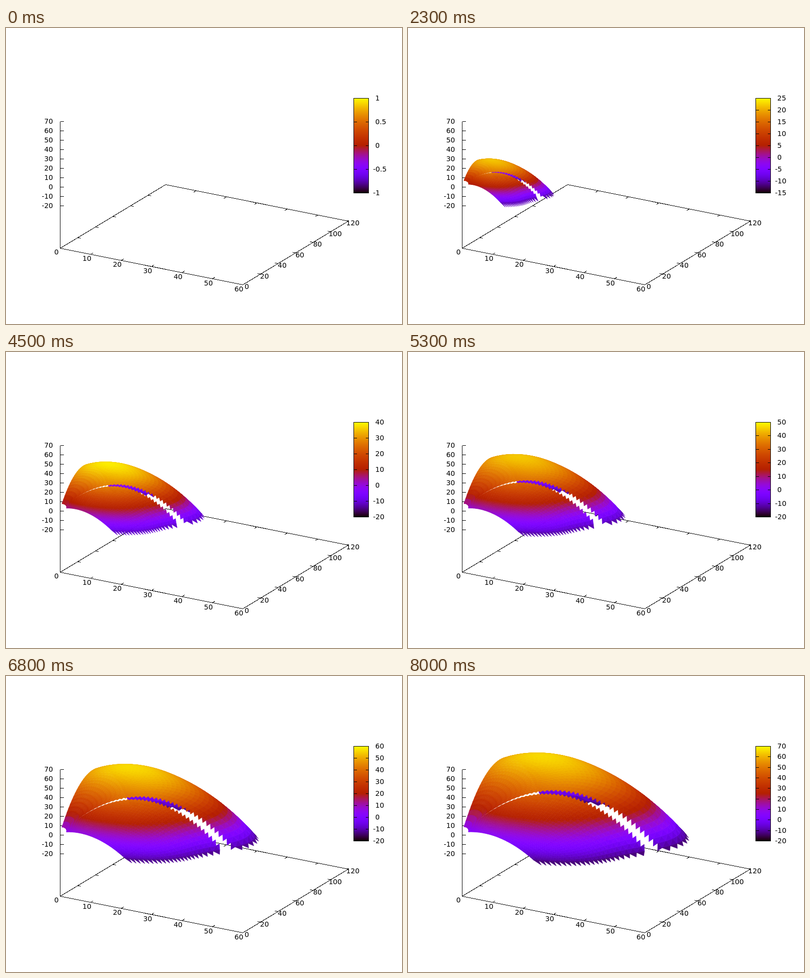
Write an HTML page with a canvas that moves like this. It is 800 px wide and 600 px high and loops after 8.1 s.

```html
<!DOCTYPE html>
<html lang="en">
<head>
<meta charset="utf-8">
<title>Launch surface</title>
<style>
  html, body { margin: 0; width: 100%; height: 100%; overflow: hidden; background: #fff; }
  svg, canvas { position: absolute; left: 0; top: 0; width: 800px; height: 600px; }
  text { font: 14px "DejaVu Sans", Verdana, sans-serif; fill: #000; white-space: pre; }
  path { fill: none; stroke: #000; stroke-width: 1; shape-rendering: crispEdges; }
  rect { shape-rendering: crispEdges; }
</style>
</head>
<body>
<svg viewBox="0 0 800 600">
  <g id="axes"></g>
  <g id="bar"></g>
  <g id="scale"></g>
</svg>
<canvas id="view" width="800" height="600"></canvas>
<script>
const STEPS = 81, STEP_MS = 100;
const RAD = Math.PI / 180;
const LAUNCH_Z = 4, T0 = 0.5, DT = 0.66;
const ctx = document.getElementById('view').getContext('2d');
const byId = id => document.getElementById(id);

// ---------- projection and palette ----------
const project = (x, y, z) => [
  109.5 + 6.15 * x + 1.775 * y,
  322.5 + 1.233 * x - 1.075 * y - 1.9 * z
];

function palette(f) {
  f = Math.min(1, Math.max(0, f));
  const c = v => Math.round(255 * Math.max(0, v));
  return `rgb(${c(Math.sqrt(f))},${c(f ** 3)},${c(Math.sin(2 * Math.PI * f))})`;
}

// ---------- static drawing ----------
const line = (x, y, dx, dy) => `M${x + 0.5} ${y + 0.5}l${dx} ${dy}`;
const label = (x, y, s, anchor) =>
  `<text x="${x}" y="${y}" text-anchor="${anchor}">${s}</text>`;

function drawAxes() {
  let d = 'M109.5 446.5L478.5 520.5L691.5 391.5L322.5 317.5ZM109.5 446.5V189.5';
  let texts = '';
  for (let i = 0; i <= 6; i++) {
    const ax = 109 + 61.5 * i, ay = 446 + 12.33 * i;
    const bx = 109 + 35.5 * i, by = 446 - 21.5 * i;
    if (i > 0 && i < 6) {
      d += line(ax, ay, 5.3, -3.2) + line(ax + 213, ay - 129, -5.3, 3.2);
      d += line(bx, by, 6.2, 1.2) + line(bx + 369, by + 74, -6.2, -1.2);
    }
    texts += label(102 + 61.4 * i, 459 + 12.5 * i, 10 * i, 'middle');
    texts += label(486.5 + 35.7 * i, 529 - 21.5 * i, 20 * i, 'middle');
  }
  for (let z = -20; z <= 70; z += 10) {
    const y = Math.round(322 - 1.9 * z);
    d += line(109, y, 7, 0);
    texts += label(95, y + 4.5, z, 'end');
  }
  byId('axes').innerHTML = `<path d="${d}"/>` + texts;

  let bands = '';
  for (let i = 0; i < 96; i++) {
    bands += `<rect x="702" y="${332 - 2 * i}" width="31" height="2" fill="${palette((i + 0.5) / 96)}"/>`;
  }
  byId('bar').innerHTML = bands + '<path d="M702.5 142.5H732.5V334.5H702.5Z"/>';
}

// ---------- colour scale ----------
function scaleFor(n) {
  if (n === 0) return { lo: -1, hi: 1, tick: 0.5 };
  const top = LAUNCH_Z + 0.775 * n, low = lowest(n);
  const range = top - low, power = 10 ** Math.floor(Math.log10(range));
  const norm = range / power;
  const tick = power * (norm < 2 ? 0.2 : norm < 5 ? 0.5 : 1);
  return { lo: Math.floor(low / tick) * tick, hi: Math.ceil(top / tick) * tick, tick };
}

function drawScale({ lo, hi, tick }) {
  let d = '', texts = '';
  const count = Math.round((hi - lo) / tick);
  for (let i = 0; i <= count; i++) {
    const v = lo + i * tick, y = Math.round(334 - 192 * i / count);
    d += line(702, y, 6, 0) + line(726, y, 6, 0);
    texts += v < 0 ? label(741.5, y + 4.5, v, 'start') : label(746, y + 4.5, v, 'start');
  }
  byId('scale').innerHTML = `<path d="${d}"/>` + texts;
}

// ---------- trajectories ----------
const lowest = n => -11 - 0.056 * n;

// one flight at azimuth a (degrees) for power n
function flight(a, n) {
  const late = Math.max(0, (a - 72) / 18) ** 2;
  const lift = (62 * Math.sin((a + 12) * RAD) ** 2 - 7 * late) * n / 80;
  const speed = (1.9 + 1.2 / (1 + Math.exp((47 - a) / 5)) - 0.2 * late) * Math.sqrt((n + 20) / 100);
  const rise = Math.sqrt(lift), cos = Math.cos(a * RAD), sin = Math.sin(a * RAD);
  return {
    at(t) {
      const r = 2 + speed * (t - T0), z = LAUNCH_Z + rise * t - t * t / 4;
      return { p: project(r * cos, r * sin, z), z };
    },
    until: z => 2 * (rise + Math.sqrt(lift + LAUNCH_Z - z))
  };
}

function triangle(a, b, c, scale) {
  const mean = (a.z + b.z + c.z) / 3;
  ctx.fillStyle = ctx.strokeStyle = palette((mean - scale.lo) / (scale.hi - scale.lo));
  ctx.beginPath();
  ctx.moveTo(...a.p);
  ctx.lineTo(...b.p);
  ctx.lineTo(...c.p);
  ctx.closePath();
  ctx.fill();
  ctx.stroke();
}

function drawSheet(from, to, strips, n, count, scale) {
  const rim = lowest(n) + 4;
  const row = a => {
    const f = flight(a, n), end = f.until(rim);
    return Array.from({ length: count + 1 }, (_, i) => f.at(T0 + (end - T0) * i / count));
  };
  let prev = row(from);
  for (let s = 1; s <= strips; s++) {
    const a = from + (to - from) * s / strips;
    const next = row(a);
    for (let i = count - 1; i >= 0; i--) {
      triangle(prev[i], prev[i + 1], next[i + 1], scale);
      triangle(prev[i], next[i], next[i + 1], scale);
    }
    const tip = flight(a - (to - from) / strips / 2, n);
    triangle(prev[count], next[count], tip.at(tip.until(lowest(n))), scale);
    prev = next;
  }
}

// saw teeth along the open seam
function drawSeam(base, tip, shift, n, count, scale) {
  const f = flight(base, n), g = flight(tip, n), end = f.until(lowest(n) + 4);
  const step = (end - T0) / count;
  for (let i = 0; i < count; i++) {
    const t = T0 + i * step;
    triangle(f.at(t), f.at(t + step), g.at(t + step * shift), scale);
  }
}

function drawStep(n) {
  const scale = scaleFor(n);
  drawScale(scale);
  ctx.clearRect(0, 0, 800, 600);
  if (n === 0) return;
  ctx.lineWidth = 0.7;
  ctx.lineJoin = 'round';
  const count = Math.round(flight(45, n).until(lowest(n)) / DT);
  drawSheet(90, 47, 22, n, count, scale);
  drawSeam(47, 45.6, 0.8, n, count, scale);
  drawSheet(43, 0, 22, n, count, scale);
  drawSeam(43, 44.2, 0.2, n, count, scale);
}

// ---------- playback ----------
let shown = -1;
const start = performance.now();
function tick() {
  const n = Math.floor((performance.now() - start) / STEP_MS) % STEPS;
  if (n !== shown) drawStep(shown = n);
  requestAnimationFrame(tick);
}
drawAxes();
tick();
</script>
</body>
</html>
```
